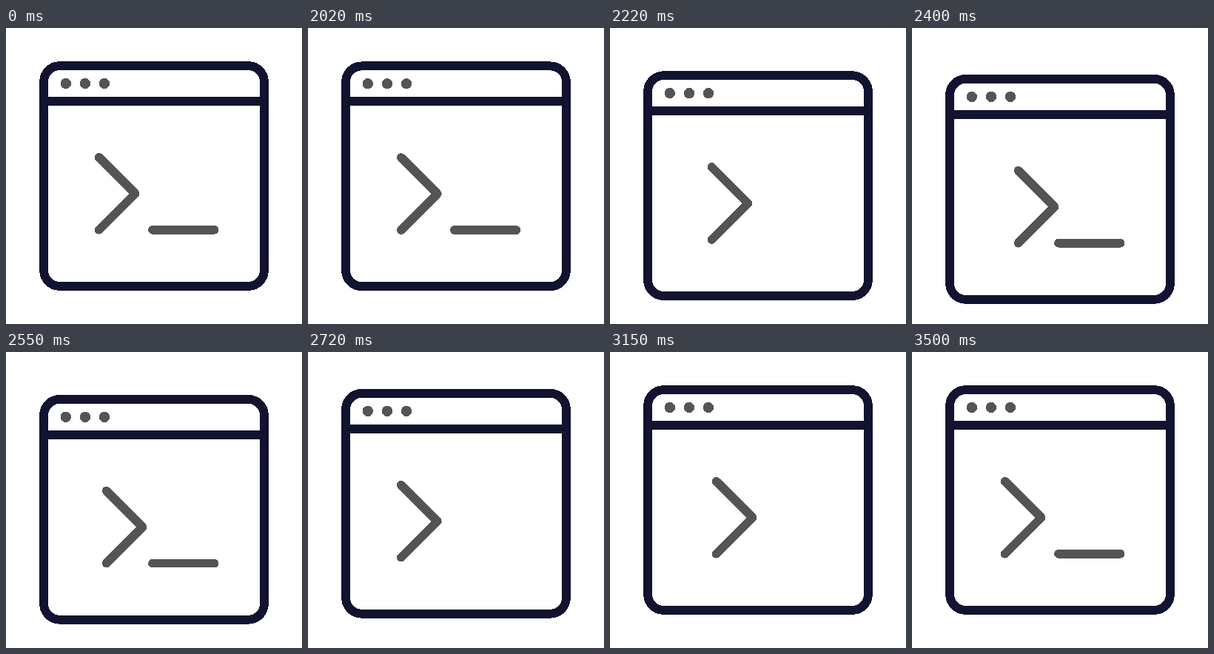
Recreate the animation shown at these times as an HTML page. Size 400 px wide and 400 px high, loop 3.52 s.

```html
<!DOCTYPE html>
<html lang="en">
<head>
<meta charset="utf-8">
<title>Terminal</title>
<style>
  html, body { margin: 0; width: 100%; height: 100%; overflow: hidden; background: #fff; }
  svg { display: block; width: 100%; height: 100%; shape-rendering: crispEdges; }
  .frame, .prompt { fill: none; stroke-linejoin: round; }
  .frame { stroke: #121331; stroke-width: 11.9; }
  .prompt { stroke: #545454; stroke-width: 11.7; stroke-linecap: round; }
  .dots { fill: #545454; }
</style>
</head>
<body>
<svg viewBox="0 0 400 400">
  <g id="win">
    <g class="frame">
      <rect x="51.1" y="51.1" width="297.8" height="297.8" rx="21.5"/>
      <path d="M51.1 99H348.9"/>
    </g>
    <g class="dots">
      <circle cx="80.8" cy="75" r="7.2"/>
      <circle cx="107" cy="75" r="7.2"/>
      <circle cx="133" cy="75" r="7.2"/>
    </g>
    <g class="prompt">
      <path id="chevron" d="M125.6 174.8L174.6 223.8L125.6 272.8"/>
      <path id="cursor" d="M198 272.8H281.6"/>
    </g>
  </g>
</svg>
<script>
const LOOP = 3520, DELAY = 1995, STEP = 25, LENGTH = 1500;
const [win, chevron, cursor] = ['win', 'chevron', 'cursor'].map(id => document.getElementById(id));

// Cubic bezier easing with control points (x1, 0) and (x2, 1).
function bezier(x1, x2) {
  return x => {
    let lo = 0, hi = 1, u;
    for (let i = 0; i < 24; i++) {
      u = (lo + hi) / 2;
      const v = 1 - u;
      if (3 * v * v * u * x1 + 3 * v * u * u * x2 + u ** 3 < x) lo = u; else hi = u;
    }
    return u * u * (3 - 2 * u);
  };
}
const smooth = bezier(1 / 3, 2 / 3), settle = bezier(1 / 3, 1 / 3);

// Rises to 1 at peak and returns to 0 at end.
function pulse(t, peak, end, fall) {
  if (t <= 0 || t >= end) return 0;
  return t < peak ? smooth(t / peak) : 1 - fall((t - peak) / (end - peak));
}

function draw(time) {
  const t = Math.min(LENGTH, Math.max(0, Math.floor((time % LOOP - DELAY) / STEP) * STEP));
  const y = 18.2 * pulse(t, 345, 1085, settle);
  const x = 18.2 * pulse(t % 750, 375, 750, smooth);
  const hidden = t >= 125 && (t - 125) % 500 < 250 && t < 1375;
  win.setAttribute('transform', `translate(0 ${y.toFixed(3)})`);
  chevron.setAttribute('transform', `translate(${x.toFixed(3)} 0)`);
  cursor.setAttribute('visibility', hidden ? 'hidden' : 'visible');
}

const start = performance.now();
function tick() {
  draw(performance.now() - start);
  requestAnimationFrame(tick);
}
tick();
</script>
</body>
</html>
```
